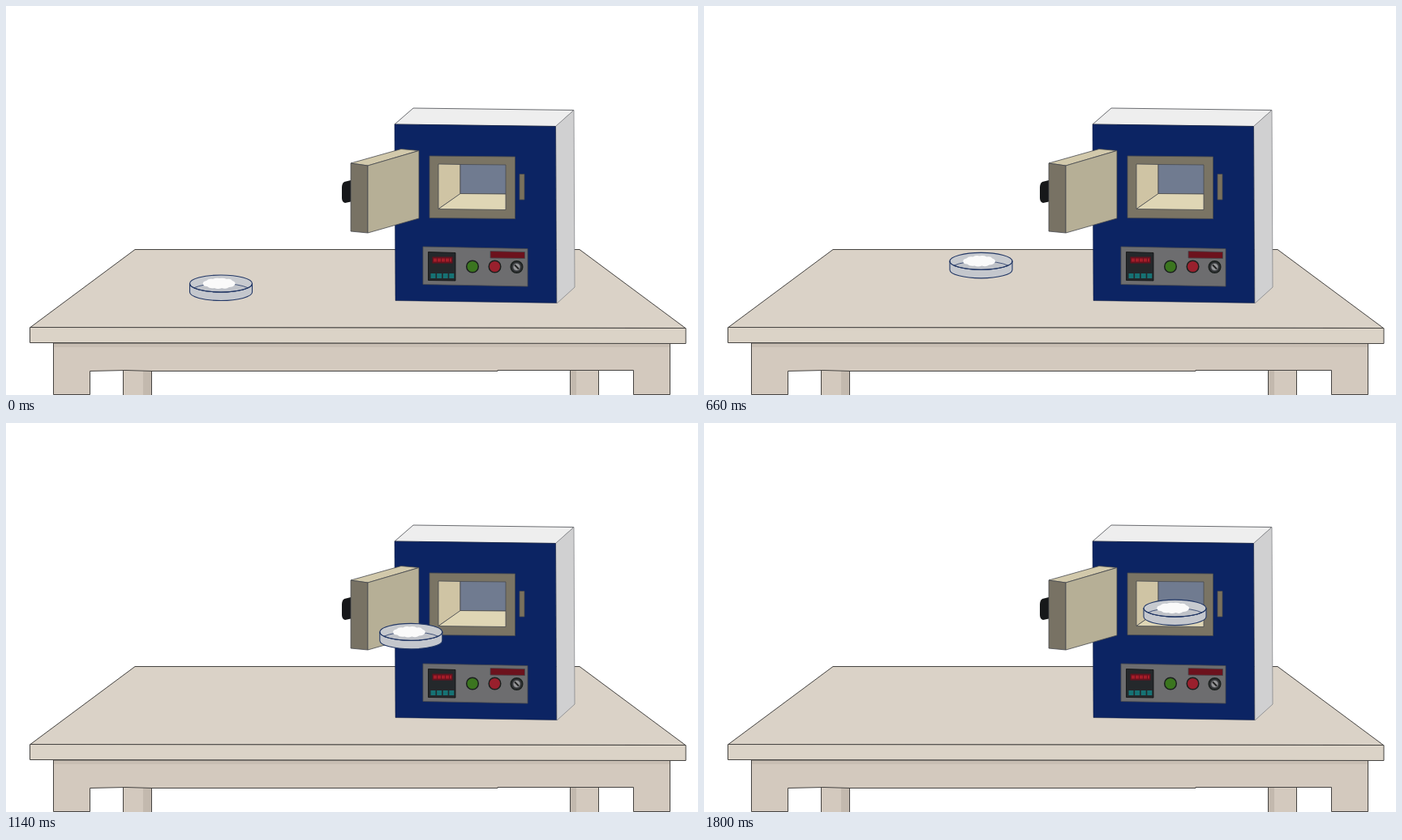
Write an HTML page that moves like this. It is 853 by 480 pixels and loops after 1860 ms.

```html
<!DOCTYPE html>
<html lang="en">
<head>
<meta charset="utf-8">
<title>Sample moving into a furnace</title>
<style>
  html, body { margin: 0; width: 100%; height: 100%; overflow: hidden; background: #fff; }
  svg { display: block; width: 100vw; height: 100vh; }
  .table { stroke: #454341; stroke-width: 1; stroke-linejoin: round; }
  .oven { stroke: #47494f; stroke-width: .8; stroke-linejoin: round; }
  .dish { stroke: #223765; stroke-width: 1.1; }
</style>
</head>
<body>
<svg viewBox="0 0 853 480">
  <g class="table">
    <!-- back legs -->
    <path d="M144.500 449V482H179.500V449M695.500 449V482H730.500V449" fill="#d3c9be"/>
    <path d="M169 450H179V480H169ZM696 450H703V480H696Z" fill="#c3b9ae" stroke="none"/>
    <!-- apron and front legs -->
    <path d="M58.500 416V479.500H103.500V450.500L148 449.500L180 450.500H606V449.500H773.500V479.500H818.500V416Z" fill="#d3c9be"/>
    <path d="M59 417H818V421H59Z" fill="#c8beb3" stroke="none"/>
    <path d="M159 300.500H707L837.500 397.500L30 396.500Z" fill="#dad2c7"/>
    <path d="M29.500 396.500L838 397.500V416.500L29.500 415.500Z" fill="#dbd3c7"/>
  </g>

  <g class="oven">
    <path d="M479 146L502 126L700 128.500L678 148.500Z" fill="#eeeeee"/>
    <path d="M677.500 148.500L700 128.500L701 347L679 367Z" fill="#d0d0d1" stroke="#85868a"/>
    <path d="M479 146L677.500 148.500L678.500 366.500L480 363.500Z" fill="#0c2463" stroke="#111c3d" stroke-width=".500"/>

    <!-- chamber -->
    <path d="M522 185L627.500 186V262.500L522 261.500Z" fill="#7a7464"/>
    <path d="M533 195L560 195.500V232L533 250.500Z" fill="#cfc4a4"/>
    <path d="M560 195.500L616 196V232L560 231.500Z" fill="#707b90"/>
    <path d="M533 250.500L560 231.500L616 232V251.500Z" fill="#dfd6b5"/>
    <path d="M633 207.500H639V239H633Z" fill="#7a715d"/>

    <!-- door -->
    <path d="M425 215L417 217Q414 219 414 224V237Q414 242 418 243L425 241.500Z" fill="#17181a" stroke="none"/>
    <path d="M425 194L487 176.500L509 178.500L446 197Z" fill="#d2c9ab"/>
    <path d="M425 194L446 197V280L425 278Z" fill="#787264"/>
    <path d="M446 197L509 178.500V262L446 280Z" fill="#b6af96"/>

    <!-- controls -->
    <path d="M514 297L643 299.500V346L514 343.500Z" fill="#6d6d6f"/>
    <path d="M520.500 303.500L554 304.500V339L520.500 338.500Z" fill="#24282b" stroke="#111"/>
    <path d="M525.500 309.500H550.500V317.500H525.500Z" fill="#65131e" stroke="none"/>
    <path d="M527 313.500H549" stroke="#a51d29" stroke-width="4" stroke-dasharray="4 1"/>
    <path d="M523.500 333H552.500" stroke="#167274" stroke-width="6" stroke-dasharray="6 1.600"/>
    <path d="M597 302.500L639.500 303.500V311.500L597 311Z" fill="#6c121d"/>
    <g stroke="#1b201e" stroke-width="1.500">
      <circle cx="575" cy="321.500" r="7.300" fill="#3b751f"/>
      <circle cx="602.500" cy="321.500" r="7.300" fill="#99202d"/>
      <circle cx="629.500" cy="322" r="7.300" fill="#313335"/>
    </g>
    <circle cx="629.500" cy="322" r="4.500" fill="#969799"/>
    <path d="M627 319.500L632 324.500" stroke="#222" stroke-width="2"/>
  </g>

  <g id="dish" class="dish" transform="translate(226 332)">
    <path d="M.500 10.500V21A38.500 10.500 0 0 0 77.500 21V10.500Z" fill="#c4c7cd"/>
    <ellipse cx="39" cy="10.500" rx="38.500" ry="10.500" fill="#c7cacf"/>
    <!-- floor seen through the opening -->
    <path d="M5.700 15.750A38.500 10.500 0 0 1 72.300 15.750A38.500 10.500 0 0 1 5.700 15.750Z" fill="#bfc2c8" stroke-width=".800"/>
    <path d="M.500 10.500A38.500 10.500 0 0 0 77.500 10.500" fill="none"/>
    <path d="M17 11Q16 8 21 7Q24 4 29 5Q33 3 37 4Q42 3 46 5Q51 4 53 7Q58 9 56 12Q54 15 49 15Q45 18 40 16Q35 18 31 16Q25 17 22 14Q17 14 17 11Z" fill="#fafafa" stroke="none"/>
  </g>
</svg>
<script>
  const LOOP = 1860, STEP = 60;
  const dish = document.getElementById("dish");

  // time (ms), distance (px), speed (px/ms)
  const path = [
    [0, 0, 0], [240, 5, .06], [480, 33, .185], [660, 76.5, .285],
    [960, 175.5, .335], [1380, 290, .135], [1800, 315.5, 0]
  ];

  function distance(t) {
    const i = Math.max(1, path.findIndex(p => p[0] >= t));
    const [t0, x0, v0] = path[i - 1], [t1, x1, v1] = path[i];
    const h = t1 - t0, u = (t - t0) / h, w = 1 - u;
    return w * w * ((1 + 2 * u) * x0 + u * h * v0)
         + u * u * ((1 + 2 * w) * x1 - w * h * v1);
  }

  function draw(now) {
    const t = Math.floor((now % LOOP) / STEP) * STEP;
    const d = distance(t);
    dish.setAttribute("transform", `translate(${226 + d} ${332 - d * .361})`);
    requestAnimationFrame(draw);
  }
  draw(performance.now());
</script>
</body>
</html>
```
